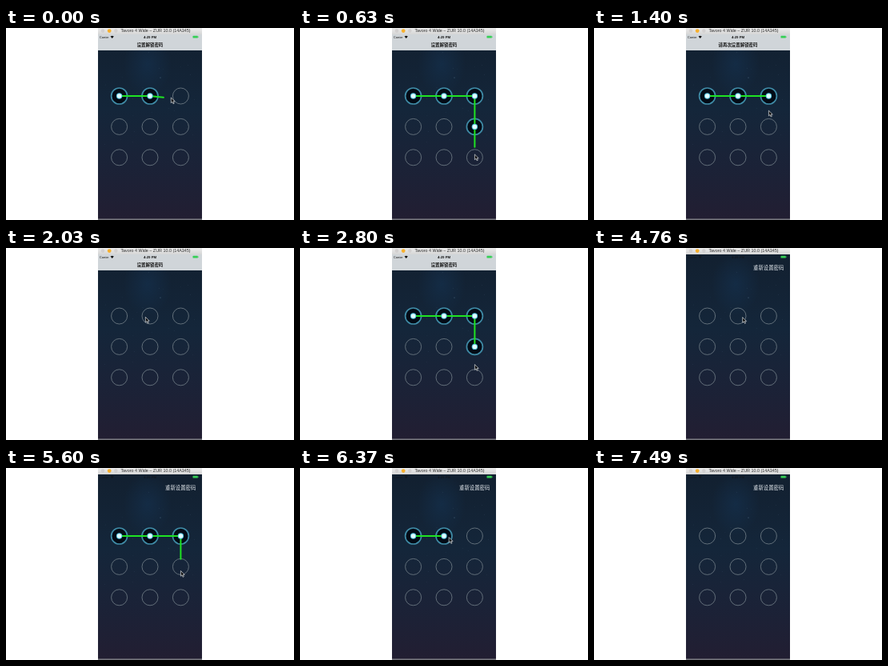
An HTML page for the animation above (7560 ms loop, 360 by 240 pixels).

```html
<!DOCTYPE html>
<html lang="zh">
<head>
<meta charset="utf-8">
<title>Pattern lock</title>
<style>
html, body { margin: 0; width: 100%; height: 100%; overflow: hidden; background: #fff }
svg { display: block; width: 360px; height: 240px }
text { font-family: "Liberation Sans", "Noto Sans CJK SC", "Noto Sans CJK", sans-serif }
.ring { fill: none; stroke: #74808a; stroke-width: .8 }
.on .ring { fill: #030b16; stroke: #3f8ba6; stroke-width: 1.7 }
.glow { display: none; fill: none; stroke: #1b4a63; stroke-width: 1 }
.on .glow { display: inline }
.dot { display: none }
.dot.on { display: inline }
</style>
</head>
<body>
<svg viewBox="0 0 360 240">
  <defs>
    <linearGradient id="sky" x2="0" y2="1">
      <stop stop-color="#122030"/>
      <stop offset=".4" stop-color="#14263a"/>
      <stop offset=".72" stop-color="#1b2237"/>
      <stop offset="1" stop-color="#221e32"/>
    </linearGradient>
    <radialGradient id="haze">
      <stop stop-color="#15375a" stop-opacity=".45"/>
      <stop offset="1" stop-color="#15375a" stop-opacity="0"/>
    </radialGradient>
    <linearGradient id="chrome" x2="0" y2="1">
      <stop stop-color="#ebebeb"/>
      <stop offset="1" stop-color="#d6d6d6"/>
    </linearGradient>
  </defs>
  <rect x="115" y="8" width="130" height="232" fill="url(#sky)"/>
  <ellipse cx="177" cy="45" rx="30" ry="40" fill="url(#haze)"/>
  <g id="stars" fill="#7fa0bb"></g>
  <rect id="bar" x="115" y="8" width="130" height="20" fill="#d0d5d9"/>
  <rect x="115" width="130" height="8" fill="url(#chrome)"/>
  <circle cx="121" cy="3.6" r="2.3" fill="#d2d0d0"/>
  <circle cx="129.2" cy="3.6" r="2.4" fill="#f6b02e"/>
  <circle cx="137.3" cy="3.6" r="2.3" fill="#d2d0d0"/>
  <text x="187" y="5.4" font-size="5.4" text-anchor="middle" fill="#2a2a2a">Tavoro 4 Wide – ZUR 10.0 (14A345)</text>
  <g id="status" fill="#111">
    <text x="117" y="13" font-size="3.8">Carrier</text>
    <path d="M130.6 10.6Q132.7 8.9 134.8 10.6L132.7 13Z"/>
    <text x="180" y="13" font-size="4.3" font-weight="bold" text-anchor="middle">4:29 PM</text>
  </g>
  <rect x="233.5" y="9.8" width="6.3" height="2.8" rx=".6" fill="#36cf55"/>
  <rect x="240.2" y="10.6" width=".6" height="1.2" fill="#36cf55"/>
  <text id="title" x="180" y="23" font-size="5.45" font-weight="bold" text-anchor="middle" fill="#151515"></text>
  <text id="reset" x="199" y="26.8" font-size="6.4" fill="#e8edf1">重新设置密码</text>
  <rect x="115" y="238.4" width="130" height="1.6" fill="#77777f"/>
  <g id="rings"></g>
  <polyline id="line" fill="none" stroke="#1ee322" stroke-width="2" stroke-linejoin="round" stroke-linecap="round"/>
  <g id="dots"></g>
  <path id="arrow" d="M0 0V6.7L1.6 5.3L2.7 7.8L3.9 7.3L2.8 4.9H4.9Z" fill="#111" stroke="#dfe3e6" stroke-width=".7"/>
</svg>
<script>
const $ = id => document.getElementById(id);
const LOOP = 7560, STEP = 70, HOLD = 140, HIDE = 7140;
const GAP = 38.4, REACH = 10 / GAP;
const nodes = Array.from({length: 9}, (_, i) =>
  [141.6 + i % 3 * GAP, 85 + Math.floor(i / 3) * GAP]);
const pattern = [0, 1, 2, 5, 8];

// When each drawing of the pattern begins and arrives at its last node
const strokes = [[-480, 660], [976, 1676], [2088, 2888], [3130, 3900], [5050, 5760], [6138, 6938]];

const clamp = (v, lo, hi) => Math.min(Math.max(v, lo), hi);

// Position after passing d node gaps: across the top row, then down
const along = d => [nodes[0][0] + Math.min(d, 2) * GAP, nodes[0][1] + Math.max(d - 2, 0) * GAP];

// Gaps travelled: steadily forward in a stroke, back again between strokes
function travel(t) {
  const i = strokes.findLastIndex(([a]) => t >= a), [a, b] = strokes[i];
  const next = strokes[i + 1]?.[0] ?? LOOP, rest = b + HOLD;
  return 4 * (t < rest ? Math.min((t - a) / (b - a), 1) : 1 - (t - rest) / (next - rest));
}

function hand(t) {
  const d = travel(t), [x, y] = along(d);
  return [x, y + 2 * Math.sin(Math.PI * d / 4)];
}

// The drawn line trails the pointer by one step.
function trace(t) {
  const late = t - STEP;
  if (!strokes.some(([a, b]) => late >= a && t < b + HOLD)) return {picked: [], points: []};
  const d = travel(late), last = clamp(Math.floor(d + REACH), 0, 4);
  const picked = pattern.slice(0, last + 1), points = picked.map(i => nodes[i]);
  if (d - last > REACH) points.push(hand(late));
  return {picked, points};
}

nodes.forEach(([x, y]) => {
  const at = `cx="${x}" cy="${y}"`;
  $('rings').innerHTML += `<g><circle class="glow" ${at} r="8.8"/><circle class="ring" ${at} r="10"/></g>`;
  $('dots').innerHTML += `<g class="dot"><circle ${at} r="3.7" fill="#52c5e2"/><circle ${at} r="2.7" fill="#e6fbff"/></g>`;
});

let seed = 7;
const rnd = () => (seed = seed * 16807 % 2147483647) / 2147483647;
for (let i = 0; i < 45; i++) {
  $('stars').innerHTML += `<circle cx="${117 + rnd() * 126}" cy="${30 + rnd() * 150}" r=".4" opacity="${rnd() * .3}"/>`;
}
$('stars').innerHTML += '<circle cx="193" cy="62" r=".6" opacity=".6"/>';

const show = (id, on) => $(id).style.display = on ? '' : 'none';

function draw(t) {
  // Two rounds of set and confirm, then the unlock screen
  const done = strokes.filter(([, b]) => t >= b + HOLD).length, home = done >= 4;
  const {picked, points} = trace(t);
  ['bar', 'title'].forEach(id => show(id, !home));
  show('reset', home);
  $('status').setAttribute('opacity', home ? .55 : 1);
  $('title').textContent = done % 2 ? '请再次设置解锁密码' : '设置解锁密码';
  for (const id of ['rings', 'dots'])
    [...$(id).children].forEach((el, i) => el.classList.toggle('on', picked.includes(i)));
  $('line').setAttribute('points', points.join(' '));
  $('arrow').setAttribute('transform', `translate(${hand(t)})`);
  show('arrow', t < HIDE);
}

const start = performance.now();
function tick() {
  const t = (performance.now() - start) % LOOP;
  draw(Math.floor(t / STEP) * STEP);
  requestAnimationFrame(tick);
}
tick();
</script>
</body>
</html>
```
